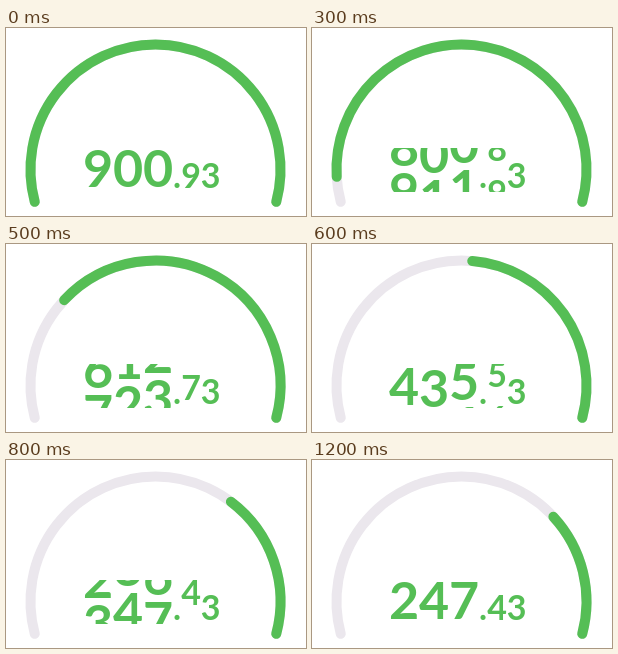
Recreate the animation shown at these times as an HTML page. Size 300 by 188 pixels, loop 2200 ms.

```html
<!DOCTYPE html>
<html lang="en">
<head>
<meta charset="utf-8">
<title>Gauge counter</title>
<style>
  html, body { margin: 0; width: 100%; height: 100%; overflow: hidden; background: #fff; }
  svg { display: block; width: 100%; height: 100%; }
  path { fill: none; stroke-width: 10; stroke-linecap: round; }
  text { font-family: Lato, sans-serif; font-weight: 700; text-anchor: middle; fill: #55be55; }
</style>
</head>
<body>
<svg viewBox="0 0 300 188">
  <clipPath id="window"><rect x="70" y="120" width="150" height="44"/></clipPath>
  <path id="track" stroke="#ebe7ed"/>
  <path id="value" stroke="#55be55"/>
  <g id="counter" clip-path="url(#window)">
    <text x="171" y="160" font-size="34">.</text>
  </g>
</svg>
<script>
const LOOP = 2200, DURATION = 1200, STEP = 100, LEAD = 45;
const PITCH = 44;
const CENTER = { x: 149.5, y: 141.5 }, RADIUS = 125;
const START = -195, END = 15;
const FROM = 900.93, TO = 247.43;

const byId = id => document.getElementById(id);

function svgNode(name, attributes, parent) {
  const node = document.createElementNS('http://www.w3.org/2000/svg', name);
  for (const key in attributes) node.setAttribute(key, attributes[key]);
  return parent.appendChild(node);
}

function makeReel(from, to, x, y, size) {
  const group = svgNode('g', {}, byId('counter'));
  for (let digit = 0; digit < 10; digit++) {
    svgNode('text', { x, y: y + digit * PITCH, 'font-size': size }, group).textContent = digit;
  }
  return { from, to, group };
}

const reels = [
  makeReel(9, 2, 92, 158.5, 52),
  makeReel(0, 4, 122, 158.5, 52),
  makeReel(0, 7, 152, 158.5, 52),
  makeReel(9, 4, 185, 160, 34),
  makeReel(3, 3, 204.5, 160, 34)
];

const mix = (a, b, amount) => a + (b - a) * amount;
const bezier = (s, p1, p2) => 3 * s * (1 - s) ** 2 * p1 + 3 * s * s * (1 - s) * p2 + s ** 3;

// cubic-bezier(.77, 0, .175, 1)
function ease(x) {
  if (x <= 0) return 0;
  if (x >= 1) return 1;
  let low = 0, high = 1;
  for (let i = 0; i < 24; i++) {
    const middle = (low + high) / 2;
    if (bezier(middle, .77, .175) < x) low = middle; else high = middle;
  }
  return bezier(low, 0, 1);
}

function pointAt(degrees) {
  const angle = degrees * Math.PI / 180;
  return `${CENTER.x + RADIUS * Math.cos(angle)} ${CENTER.y + RADIUS * Math.sin(angle)}`;
}

function drawArc(id, start) {
  const large = END - start > 180 ? 1 : 0;
  byId(id).setAttribute('d', `M${pointAt(start)}A${RADIUS} ${RADIUS} 0 ${large} 1 ${pointAt(END)}`);
}

function render(time) {
  const stepped = Math.floor(time % LOOP / STEP) * STEP;
  const progress = stepped ? ease((stepped + LEAD) / DURATION) : 0;
  drawArc('value', mix(START, END, progress * (1 - TO / FROM)));
  for (const { from, to, group } of reels) {
    group.setAttribute('transform', `translate(0 ${-mix(from, to, progress) * PITCH})`);
  }
}

drawArc('track', START);
const begin = performance.now();
function frame() {
  render(performance.now() - begin);
  requestAnimationFrame(frame);
}
frame();
</script>
</body>
</html>
```
